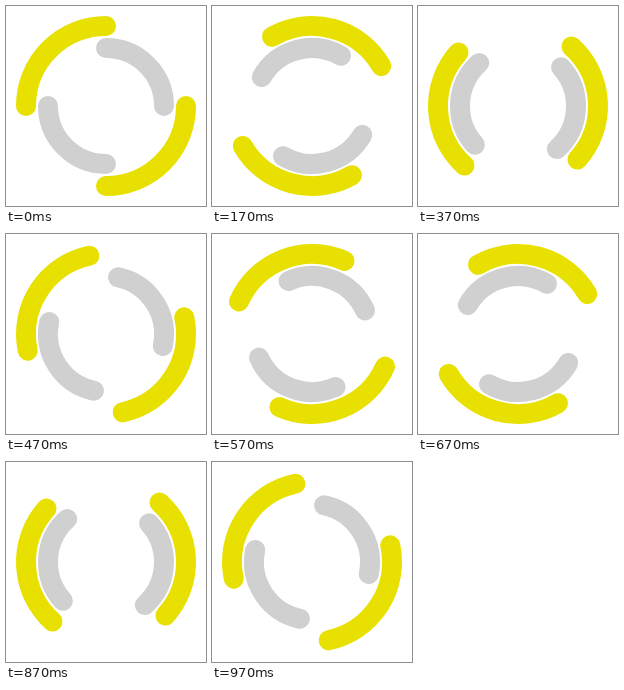
Animation of 200x200 px, one loop 1 s. Source, as an HTML page:

```html
<!DOCTYPE html>
<html lang="en">
<head>
<meta charset="utf-8">
<title>Double ring spinner</title>
<style>
  html, body { margin: 0; width: 100%; height: 100%; overflow: hidden; background: #fff; }
  svg { display: block; width: 100%; height: 100%; }
  path { fill: none; stroke-width: 20; stroke-linecap: round; }
</style>
</head>
<body>
<svg viewBox="-100 -100 200 200">
  <path id="outer" stroke="#e8e000" d="M80 0A80 80 0 0 1 0 80M-80 0A80 80 0 0 1 0-80"/>
  <path id="inner" stroke="#d0d0d0" d="M0 58A58 58 0 0 1-58 0M0-58A58 58 0 0 1 58 0"/>
</svg>
<script>
  const outer = document.getElementById('outer');
  const inner = document.getElementById('inner');
  const start = performance.now();

  // 30 steps per second, with step times rounded to 10 ms: 0, 30, 70, 100, ...
  function stepAt(ms) {
    const rest = ms % 100;
    return 3 * Math.floor(ms / 100) + (rest >= 30) + (rest >= 70);
  }

  function draw() {
    const ms = Math.max(0, performance.now() - start) % 1000;
    const angle = 12 * stepAt(ms);
    outer.setAttribute('transform', `rotate(${angle})`);
    inner.setAttribute('transform', `rotate(${-angle})`);
    requestAnimationFrame(draw);
  }
  draw();
</script>
</body>
</html>
```
